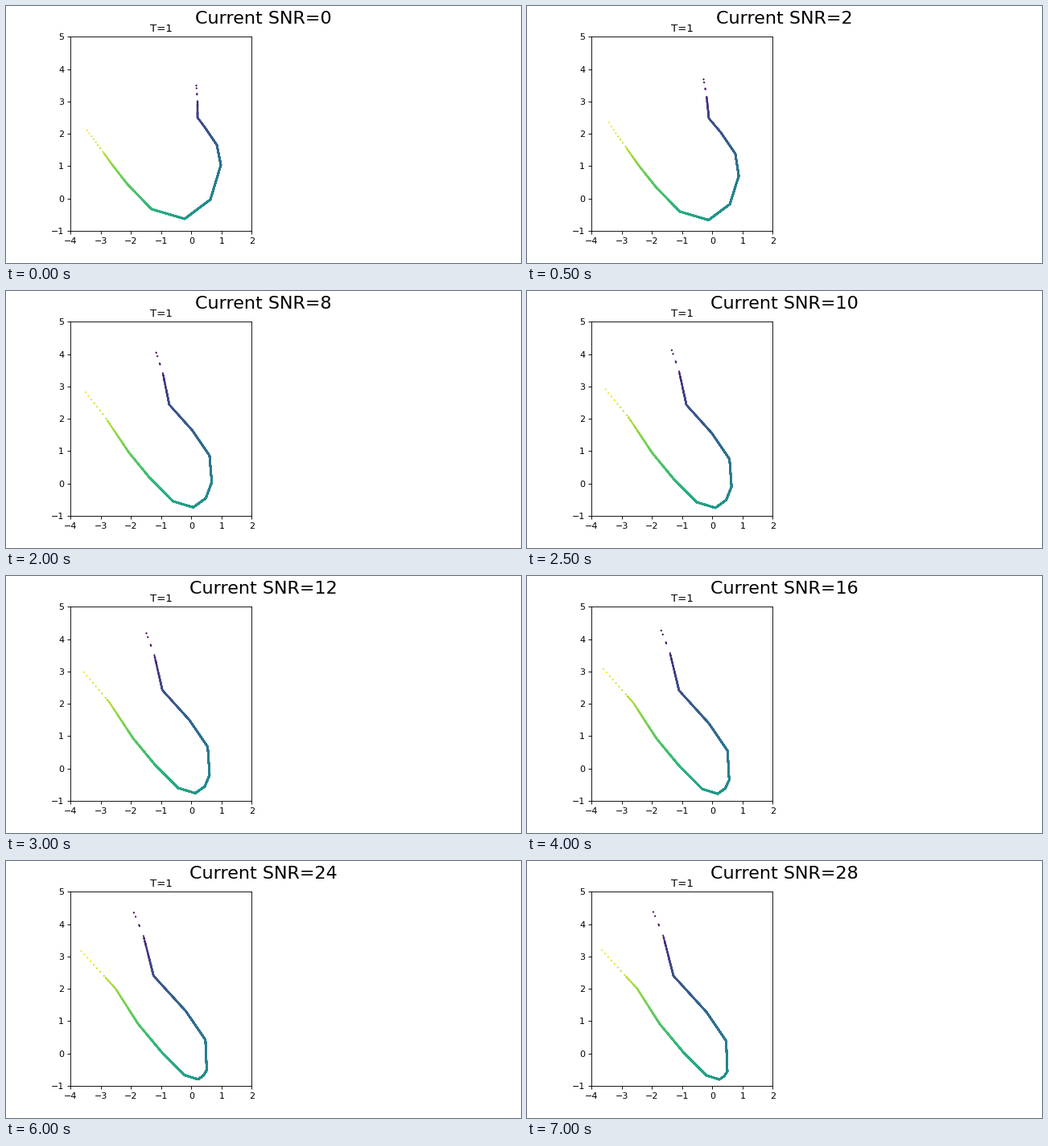
A matplotlib script for the animation above (7500 ms loop, 640x320 px).

```python
import numpy as np
import matplotlib.pyplot as plt
from matplotlib.animation import FuncAnimation

plt.rcParams.update({
    "font.family": "DejaVu Sans",
    "font.size": 10,
    "figure.subplot.bottom": 0.125,
})

FRAMES, STEP_MS, STEP_DB = 15, 500, 2


def noise(snr):
    """Noise amplitude for a signal-to-noise ratio in dB."""
    return 10 ** (-snr / 20)


# Bends of the curve as (stage x, stage y, latent u), at 0 dB and at 28 dB.
# Each bend moves in a straight line, in proportion to the noise.
BENDS = np.array([
    [(236.5, 99, 0), (157, 63.5, 0)],
    [(238, 118, .10), (169, 92, .10)],
    [(238, 139, .21), (182, 143, .25)],
    [(246, 149.5, .24), (223, 188, .34)],
    [(262, 173, .31), (247.5, 224, .41)],
    [(267, 198, .38), (249, 262, .47)],
    [(254, 241, .46), (245, 268, .50)],
    [(222, 265, .55), (239, 272, .53)],
    [(181, 253, .65), (223, 267, .57)],
    [(151, 222, .75), (195, 239, .64)],
    [(133, 199, .83), (165, 203, .73)],
    [(97, 149.5, 1.02), (137, 159, .84)],
    [(88, 117, 1.10), (65.5, 81, 1.10)],
])

# A dense normal body with a few stragglers at either end.
rng = np.random.default_rng(3)
body = rng.normal(0.5, 0.13, 10000)
body = body[(body > 0.1) & (body < 0.906)]
u = np.concatenate([[0, .018, .054, .059], body, np.linspace(.914, 1, 7)])


def curve(snr):
    mix = (noise(snr) - noise(28)) / (1 - noise(28))
    px, py, at = (BENDS[:, 1] + (BENDS[:, 0] - BENDS[:, 1]) * mix).T
    x = (np.interp(u, at, px) - 80) * 6 / 225.45 - 4
    y = (280 - np.interp(u, at, py)) * 6 / 241.6 - 1
    return np.column_stack([x, y])


fig = plt.figure(figsize=(8, 4), dpi=80, facecolor="white")
ax = fig.add_subplot(1, 2, 1)
ax.set(xlim=(-4, 2), ylim=(-1, 5), xticks=range(-4, 3), yticks=range(-1, 6))
ax.set_title("T=1")
heading = fig.suptitle("Current SNR=0", fontsize=20)
dots = ax.scatter(*curve(0).T, c=u, s=1, cmap="viridis", vmin=0, vmax=1)


def update(i):
    snr = i * STEP_DB
    dots.set_offsets(curve(snr))
    heading.set_text(f"Current SNR={snr}")
    return dots, heading


anim = FuncAnimation(fig, update, frames=FRAMES, interval=STEP_MS,
                     repeat=True, repeat_delay=0, blit=False)
plt.show()
```
